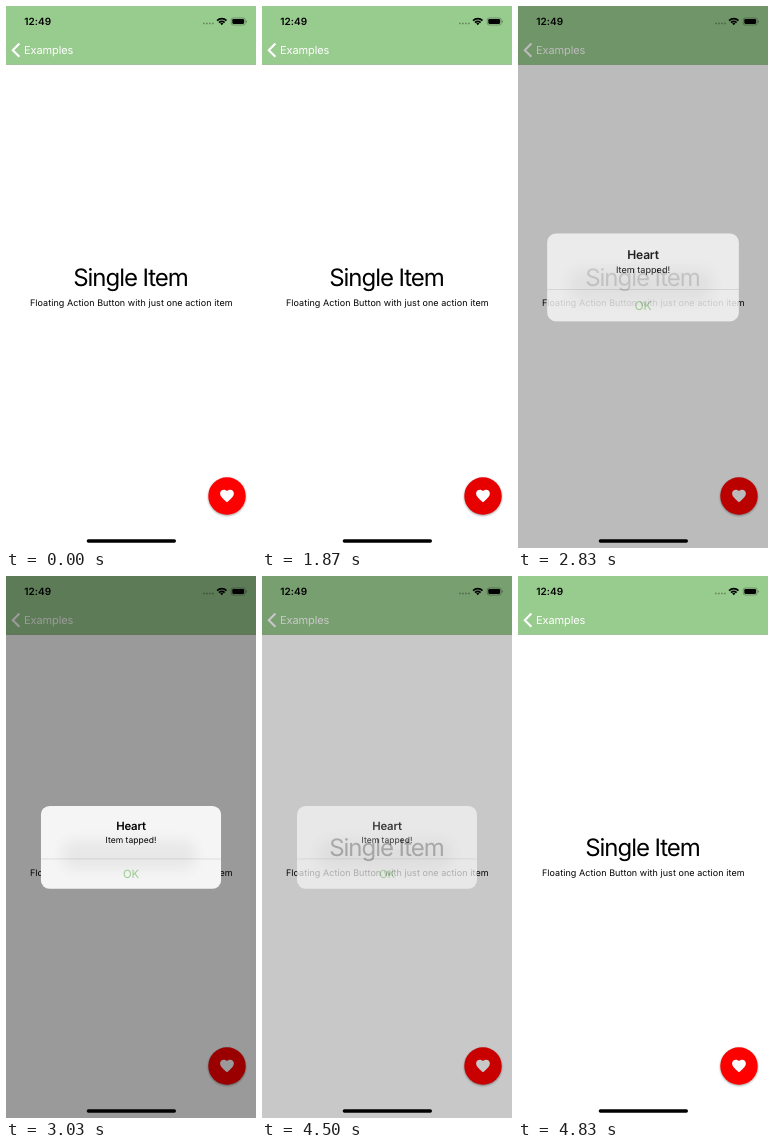
Write an HTML page that moves like this. It is 250 by 542 pixels and loops after 4910 ms.

```html
<!DOCTYPE html>
<html lang="en">
<meta charset="utf-8">
<title>Single item</title>
<style>
  html, body { margin: 0; height: 100%; overflow: hidden; background: #fff; }
  svg { display: block; width: 250px; height: 542px; font-family: Inter, sans-serif; text-rendering: geometricPrecision; }
  .mid { text-anchor: middle; }
</style>
<svg viewBox="0 0 250 542">
  <defs>
    <filter id="soft" x="-50%" y="-100%" width="200%" height="300%"><feGaussianBlur stdDeviation="7"/></filter>
    <filter id="shadow" x="-30%" y="-30%" width="160%" height="160%"><feGaussianBlur stdDeviation="1.2"/></filter>
    <clipPath id="card"><rect x="35" y="230" width="180" height="82.7" rx="8.7"/></clipPath>
  </defs>

  <rect width="250" height="542" fill="#fff"/>
  <rect width="250" height="59" fill="#b2b2b2"/>
  <rect width="250" height="58.67" fill="#98cb8e"/>
  <path d="M13.4 37.6 6.8 44.2 13.4 50.8" fill="none" stroke="#fff" stroke-width="2.1"/>
  <text x="18" y="48.2" font-size="11" letter-spacing="-.1" fill="#fff">Examples</text>
  <text class="mid" x="124.5" y="280" font-size="24" letter-spacing="-1.05">Single Item</text>
  <text class="mid" x="125.3" y="299.8" font-size="9" letter-spacing=".06">Floating Action Button with just one action item</text>

  <circle cx="221" cy="491" r="18.7" opacity=".4" filter="url(#shadow)"/>
  <circle id="button" cx="221" cy="490" r="18.7"/>
  <path transform="translate(212.7 481.6) scale(.69)" fill="#fff" d="M12 21.35l-1.45-1.32C5.4 15.36 2 12.28 2 8.5 2 5.42 4.42 3 7.5 3c1.74 0 3.41.81 4.5 2.09C13.09 3.81 14.76 3 16.5 3 19.58 3 22 5.42 22 8.5c0 3.78-3.4 6.86-8.55 11.54z"/>

  <rect id="dim" width="250" height="542"/>

  <g id="alert">
    <g clip-path="url(#card)">
      <rect x="35" y="230" width="180" height="83" fill="#f5f5f5"/>
      <rect x="56" y="264" width="134" height="30" rx="12" opacity=".05" filter="url(#soft)"/>
      <rect id="press" x="35" y="282.7" width="180" height="30" opacity=".1"/>
      <rect x="35" y="282.7" width="180" height=".5" opacity=".2"/>
    </g>
    <g class="mid">
      <text x="125" y="253.8" font-size="11.33" font-weight="600" letter-spacing="-.2">Heart</text>
      <text x="125" y="266.9" font-size="8.5" letter-spacing=".03">Item tapped!</text>
      <text x="125" y="302" font-size="11.33" letter-spacing="-.27" fill="#98cb8e">OK</text>
    </g>
  </g>

  <text x="18.3" y="19" font-size="10" font-weight="600" letter-spacing=".05">12:49</text>
  <path d="M197 17.5h11" stroke="#000" stroke-width="1.6" stroke-dasharray="1.8 1.2" opacity=".3"/>
  <g fill="none" stroke="#000" stroke-width="1.7">
    <path d="M211.1 14.6a6.7 6.7 0 0 1 9.4 0M213 16.6a4 4 0 0 1 5.6 0"/>
    <path d="M215.8 19.2 214.2 17.6a2.3 2.3 0 0 1 3.2 0z" fill="#000" stroke="none"/>
    <rect x="225.2" y="12" width="14" height="7" rx="2" stroke-width=".7" opacity=".4"/>
  </g>
  <rect x="226.3" y="13.1" width="11.8" height="4.8" rx="1.1"/>
  <path d="M240 14.2a1.4 1.4 0 0 1 0 2.6z" opacity=".4"/>
  <rect x="80.7" y="533.3" width="89.3" height="3.4" rx="1.7"/>
</svg>
<script>
  const LOOP = 4910, STEP = 100 / 3;
  const el = id => document.getElementById(id);
  const [button, dim, alertBox, press] = ['button', 'dim', 'alert', 'press'].map(el);

  // Critically damped spring from 0 to 1
  const spring = ms => {
    const x = Math.max(0, ms) * 0.0215;
    return 1 - (1 + x) * Math.exp(-x);
  };

  function draw(now) {
    // The screen refreshes 30 times a second
    const t = Math.floor((now % LOOP + 4) / STEP) * STEP;
    const entry = spring(t - 2726);
    const shown = t > 4815 ? 0 : entry * (1 - spring(t - 4428));
    const scale = 1.2 - 0.2 * entry;

    button.setAttribute('fill', t > 1860 && t < 1925 ? '#e60000' : '#f00');
    dim.setAttribute('opacity', 0.4 * shown);
    alertBox.setAttribute('opacity', 1 - (1 - shown) ** 1.6);
    alertBox.setAttribute('transform', `translate(125 271.3) scale(${scale}) translate(-125 -271.3)`);
    press.setAttribute('visibility', t > 3890 && t < 4395 ? 'visible' : 'hidden');
  }

  const start = performance.now();
  (function tick() {
    draw(performance.now() - start);
    requestAnimationFrame(tick);
  })();
</script>
</html>
```
